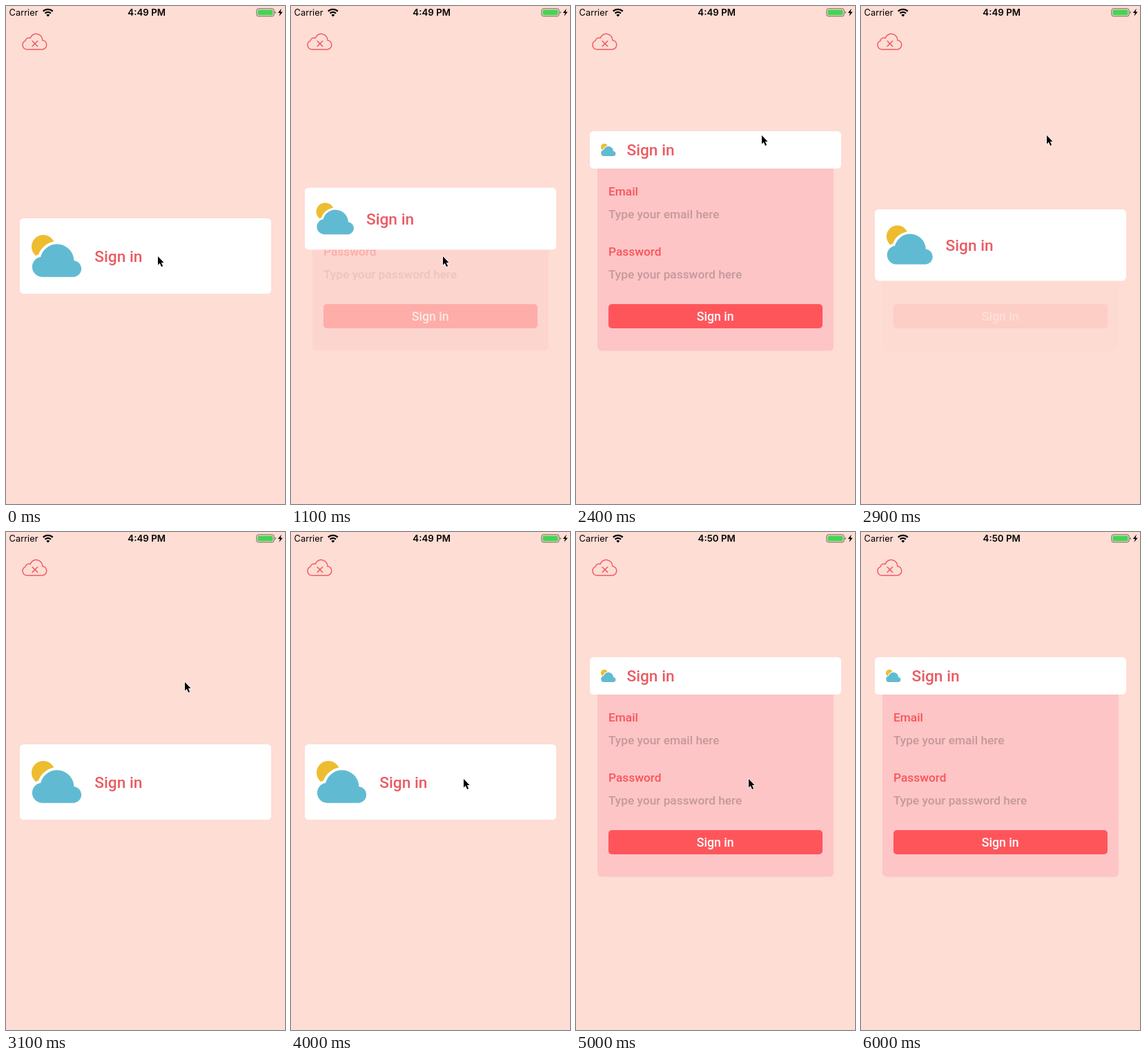
Animation, 404 px wide and 720 px high, one loop 6.1 s. Source, as an HTML page:

```html
<!DOCTYPE html>
<html lang="en">
<head>
<meta charset="utf-8">
<title>Expanding sign-in card</title>
<style>
  html, body { margin: 0; width: 100%; height: 100%; overflow: hidden; background: #fdddd4; }
  svg { display: block; width: 404px; height: 720px; }
  text { font: 500 17.3px Roboto, sans-serif; }
  .status { font: 400 12.8px Inter, sans-serif; }
  .clock { font-weight: 600; font-size: 13.3px; text-anchor: middle; }
  .label { fill: #fa535a; }
  .hint { fill: #c4999b; }
  .button { fill: #fff; font-size: 17.7px; text-anchor: middle; }
  #title { fill: #eb5a61; font-size: 22.7px; }
</style>
</head>
<body>
<svg viewBox="0 0 404 720">
  <clipPath id="below"><rect id="reveal" width="404" height="720"/></clipPath>
  <rect width="404" height="720" fill="#fdddd4"/>

  <text class="status" x="4.6" y="14">Carrier</text>
  <g fill="none" stroke="#000" stroke-width="2.3">
    <path d="M53.8 7.6a10 10 0 0 1 13.9 0M56.6 10.6a6 6 0 0 1 8.3 0"/>
    <path d="M60.8 15.4l-2.4-2.5a3.5 3.5 0 0 1 4.8 0z" fill="#000" stroke="none"/>
  </g>
  <text class="status clock" id="clock" x="203.7" y="14"></text>
  <rect x="362.9" y="3.8" width="25.2" height="11" rx="2.6" fill="none" stroke="#6f625f"/>
  <rect x="364.5" y="5.4" width="22" height="7.8" rx="1.3" fill="#43d551"/>
  <path d="M389.5 7.3a2.2 2.2 0 0 1 0 4z" fill="#6f625f"/>
  <path d="M398.8 3.8l-5 6.2h3.1l-1.4 4.8 5.1-6.3h-3.1z"/>

  <g fill="none" stroke="#f25c64" stroke-width="1.5">
    <path d="M30.5 62.7A6.4 6.4 0 0 1 28 50.4A5.4 5.4 0 0 1 35.3 46.3A9 9 0 0 1 52.8 49.4A6.7 6.7 0 0 1 53 62.7Z"/>
    <path d="M37.7 50.2l8.4 8.4m0-8.4l-8.4 8.4"/>
  </g>

  <g id="panel" clip-path="url(#below)">
    <rect x="31" y="208" width="342" height="290.5" rx="6" fill="#fdc5c6"/>
    <text class="label" x="47" y="274.3">Email</text>
    <text class="hint" x="47" y="307">Type your email here</text>
    <text class="label" x="47" y="361.3">Password</text>
    <text class="hint" x="47" y="394">Type your password here</text>
    <rect x="47" y="431" width="310" height="35" rx="5" fill="#fe555b"/>
    <text class="button" x="201.7" y="455.3">Sign in</text>
  </g>

  <rect id="card" x="20" width="364" rx="5.5" fill="#fff"/>
  <g id="weather">
    <circle cx="17" cy="-13.5" r="17" fill="#eebc2f"/>
    <path d="M15 30.2A14.6 14.6 0 0 1 13.2 1.2A24.5 24.5 0 0 1 61.4 6.4A12 12 0 0 1 62 30.2Z"
          fill="#60bbd2" stroke="#fff" stroke-width="8" paint-order="stroke"/>
  </g>
  <text id="title">Sign in</text>

  <path id="cursor" d="M0 0V12.4L2.8 9.7L5.1 14.9L7.1 14L4.9 8.9H8.6Z"
        stroke="#fff" stroke-width="1.4" paint-order="stroke"/>
</svg>
<script>
const LOOP = 6100, STEP = 100, FOLD_TIME = 500;
const OPEN_1 = 900, CLOSE = 2500, OPEN_2 = 4258;
const CLOCK_TICK = 4300, CURSOR_HIDE = 5200;

// Pointer stops: time, x, y
const stops = [
  [0, 220, 362], [1500, 220, 362], [2200, 269, 187], [2900, 269, 187],
  [3100, 259, 217], [3700, 250, 357], [LOOP, 250, 357]
];

const el = id => document.getElementById(id);
const set = (id, attrs) => {
  for (const name in attrs) el(id).setAttribute(name, attrs[name]);
};
const mix = (a, b, k) => a + (b - a) * k;
const ease = u => {
  u = Math.min(1, Math.max(0, u));
  return u * u * (3 - 2 * u);
};
const fold = (t, start) => ease((t - start) / FOLD_TIME);

function pointer(t) {
  const i = stops.findIndex(s => s[0] > t);
  const [t0, x0, y0] = stops[i - 1], [t1, x1, y1] = stops[i];
  const k = ease((t - t0) / (t1 - t0));
  return [mix(x0, x1, k), mix(y0, y1, k)];
}

function draw(t) {
  const open = fold(t, OPEN_1) - fold(t, CLOSE) + fold(t, OPEN_2);
  const top = mix(307, 181, open), height = mix(109, 54, open);
  const middle = top + height / 2;

  set('card', { y: top, height });
  set('reveal', { y: middle });
  set('panel', { opacity: open });
  set('weather', {
    transform: `translate(${mix(37, 36, open)} ${middle}) scale(${mix(1, 0.297, open)})`
  });
  set('title', { x: mix(128.3, 73.5, open), y: middle + 8.3 });
  set('cursor', {
    transform: `translate(${pointer(t)})`,
    visibility: t < CURSOR_HIDE ? 'visible' : 'hidden'
  });
  el('clock').textContent = t < CLOCK_TICK ? '4:49 PM' : '4:50 PM';
}

function tick() {
  const t = performance.now() % LOOP;
  draw(Math.floor(t / STEP) * STEP);
  requestAnimationFrame(tick);
}
tick();
</script>
</body>
</html>
```
